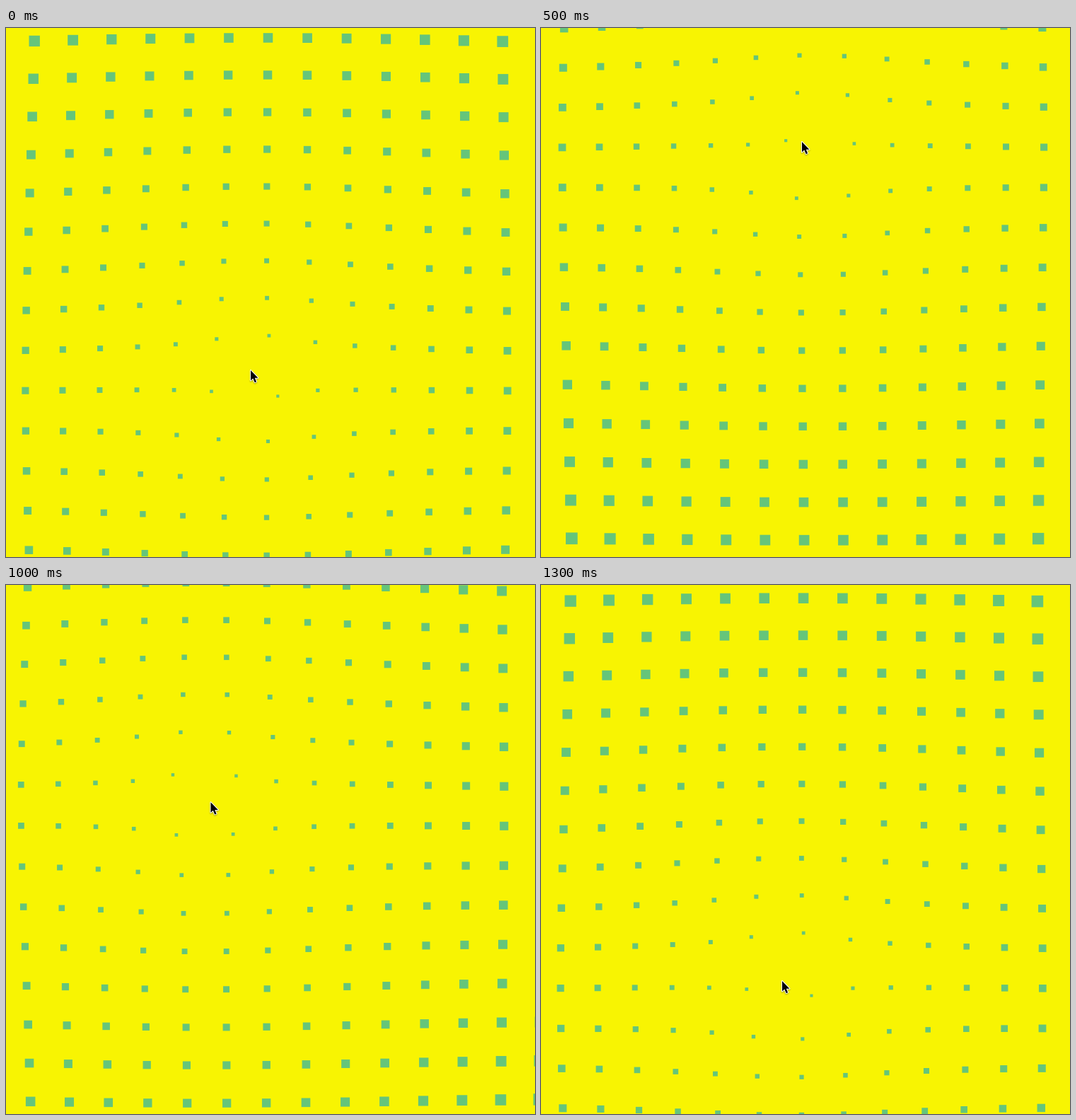
These frames come from a looping animation (748 px wide and 748 px high, 1.4 s). An HTML page with a canvas:

```html
<!DOCTYPE html>
<html lang="en">
<head>
<meta charset="utf-8">
<title>Squares pushed by the pointer</title>
<style>
  html, body { margin: 0; width: 100%; height: 100%; overflow: hidden; background: #f8f402; }
  canvas { display: block; }
</style>
</head>
<body>
<canvas id="stage" width="748" height="748"></canvas>
<script>
const SIZE = 748, LOOP = 14, STEP_MS = 100;
const GAP = 53.07, PUSH = 22.3, DRIFT = 0.075;
const ctx = document.getElementById('stage').getContext('2d');
const arrow = new Path2D('M0 0V14.6L3.3 11.6L5.7 17.2L8.1 16.2L5.8 10.7H10.4Z');

// step, centre of the push (x, y), pointer tip (x, y); the pointer runs slightly ahead
const keys = [
  [0, 349.5, 499, 346, 484],
  [3, 374.5, 260, 379, 254],
  [5, 380, 168.5, 369, 161],
  [7, 239.3, 127.7, 229, 131],
  [9, 173, 262, 185, 268],
  [11, 382.8, 344.3, 393, 355],
  [13, 352, 555, 341, 560]
];

// Key i of the endless track, with its time shifted by whole loops
function key(i) {
  const n = keys.length, turn = Math.floor(i / n);
  const k = keys[i - turn * n].slice();
  k[0] += turn * LOOP;
  return k;
}

// Smooth cubic through the keys, column c
function track(c, step) {
  let i = 0;
  while (key(i + 1)[0] <= step) i++;
  const [a, b, d, e] = [key(i - 1), key(i), key(i + 1), key(i + 2)];
  const span = d[0] - b[0], u = (step - b[0]) / span;
  const m0 = (d[c] - a[c]) / (d[0] - a[0]) * span;
  const m1 = (e[c] - b[c]) / (e[0] - b[0]) * span;
  const u2 = u * u, u3 = u2 * u;
  return (2 * u3 - 3 * u2 + 1) * b[c] + (u3 - 2 * u2 + u) * m0
    + (3 * u2 - 2 * u3) * d[c] + (u3 - u2) * m1;
}

function drawGrid(mx, my) {
  ctx.fillStyle = '#65c57a';
  for (let row = -1; row < 15; row++) {
    for (let col = -1; col < 15; col++) {
      const x = 18.45 + DRIFT * mx + col * GAP;
      const y = 45.1 + DRIFT * my + row * GAP;
      const dx = x - mx, dy = y - my, dist = Math.hypot(dx, dy) || 1;
      const side = 3.8 + 0.0207 * dist;
      ctx.fillRect(x + PUSH * dx / dist, y + PUSH * dy / dist, side, side);
    }
  }
}

function drawPointer(x, y) {
  ctx.save();
  ctx.translate(x, y);
  ctx.lineWidth = 2;
  ctx.lineJoin = 'round';
  ctx.strokeStyle = '#fff';
  ctx.shadowColor = 'rgba(0, 0, 0, 0.35)';
  ctx.shadowBlur = 2;
  ctx.shadowOffsetY = 1;
  ctx.stroke(arrow);
  ctx.shadowColor = 'transparent';
  ctx.fillStyle = '#000';
  ctx.fill(arrow);
  ctx.restore();
}

const start = performance.now();

function draw() {
  const step = Math.floor((performance.now() - start) / STEP_MS) % LOOP;
  const at = c => track(c, step);
  ctx.fillStyle = '#f8f402';
  ctx.fillRect(0, 0, SIZE, SIZE);
  drawGrid(at(1), at(2));
  drawPointer(at(3), at(4));
  requestAnimationFrame(draw);
}
draw();
</script>
</body>
</html>
```
